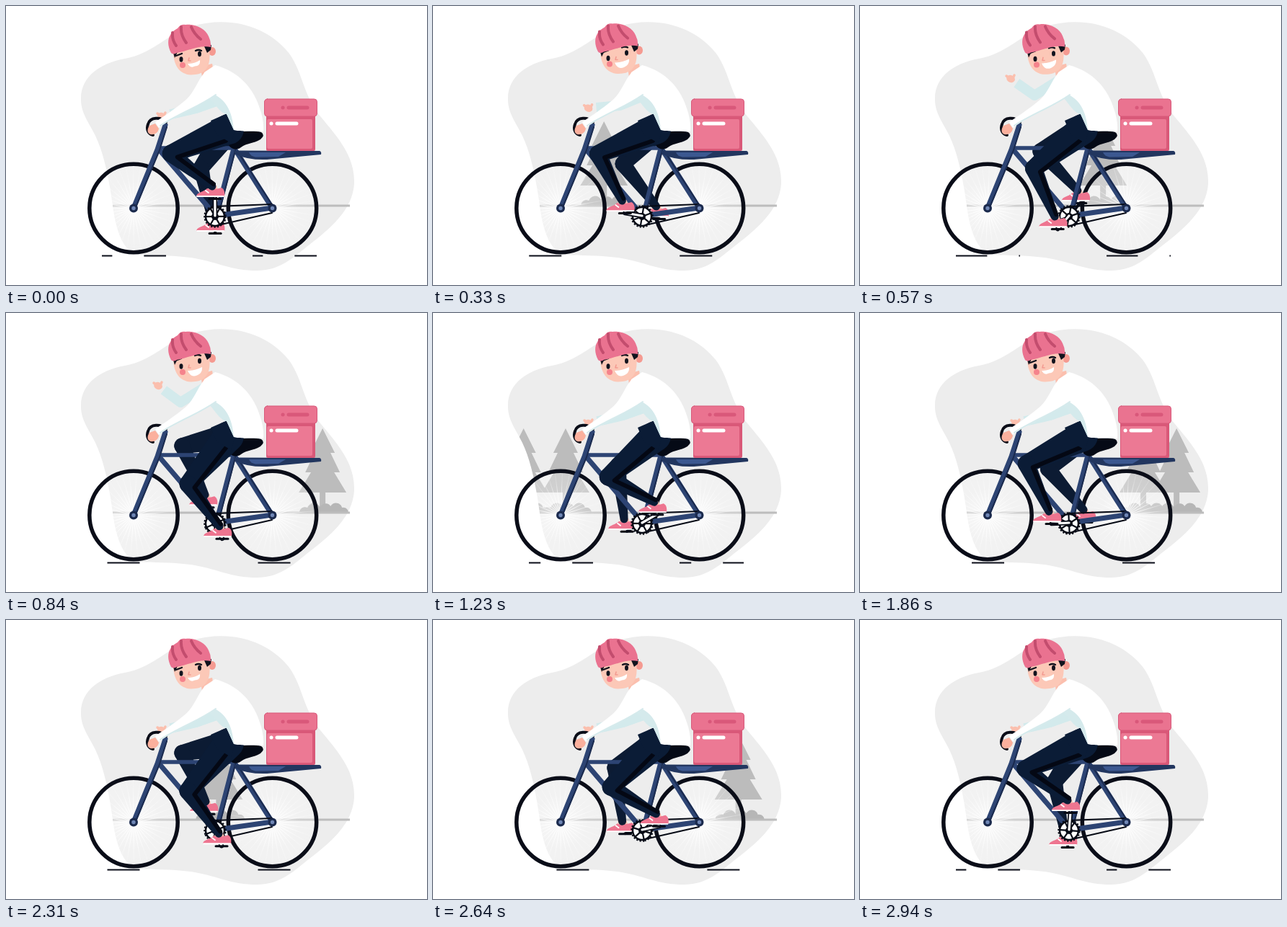
Recreate the animation shown at these times as an HTML page. Size 584 px wide and 387 px high, loop 2970 ms.

```html
<!DOCTYPE html>
<html lang="en">
<head>
<meta charset="utf-8">
<title>Cyclist</title>
<style>
html, body { margin: 0; width: 100%; height: 100%; overflow: hidden; background: #fff; }
svg { display: block; width: 584px; height: 387px; }
</style>
</head>
<body>
<svg viewBox="0 0 584 387" fill="none" stroke-linecap="round" stroke-linejoin="round">
  <defs>
    <path id="blob" d="M104 130C103 98 131 79 165 73C203 66 222 40 258 28C311 13 363 28 393 66C412 93 412 123 436 153C462 184 484 209 483 246C481 282 452 307 421 331C400 347 382 367 348 367C312 367 296 356 262 350C232 345 205 347 185 345C163 342 153 314 148 277C143 240 136 205 124 180C114 160 104 148 104 130Z"/>
    <clipPath id="inBlob"><use href="#blob"/></clipPath>
    <radialGradient id="glow">
      <stop offset="0" stop-color="#fff" stop-opacity=".7"/>
      <stop offset=".6" stop-color="#fff" stop-opacity=".3"/>
      <stop offset="1" stop-color="#fff" stop-opacity=".25"/>
    </radialGradient>
    <radialGradient id="fade" gradientUnits="userSpaceOnUse" cx="0" cy="0" r="60">
      <stop offset=".3" stop-color="#fff"/>
      <stop offset=".8" stop-color="#fff" stop-opacity=".25"/>
    </radialGradient>
    <g id="tree">
      <path fill="#bcbcbc" d="M0 160L17 194H11L24 221H16L33 249H4V276H-4V249H-33L-16 221H-24L-11 194H-17Z"/>
      <path fill="#b6b6b6" d="M-32 277C-32 270-25 268-21 270C-17 261-7 262-4 269C2 262 9 264 11 268C16 260 26 264 27 270C32 269 36 273 36 277Z"/>
    </g>
    <g id="shoe">
      <path fill="#fbc3b1" d="M-10-18H2L5-9H-10Z"/>
      <path fill="#ee7590" d="M-26-3C-25-9-17-8-11-14C-5-11 1-13 9-15C13-13 14-8 13-3Z"/>
      <path stroke="#fff" stroke-width="1.8" d="M-25-3H12M-13-11L-9-8"/>
      <path stroke="#070b16" stroke-width="3" d="M-8 0.500H8"/>
    </g>
  </defs>

  <use href="#blob" fill="#ededed"/>
  <g clip-path="url(#inBlob)">
    <g id="trees"></g>
  </g>
  <path stroke="#bdbdbd" stroke-width="3" stroke-linecap="butt" d="M148 277H477"/>
  <g id="dashes" stroke="#0a0d18" stroke-width="2" stroke-linecap="butt"></g>
  <g id="wheels"></g>

  <g id="farArm">
    <path id="farSleeve" stroke="#d3eaec" stroke-width="14" stroke-linecap="butt"/>
    <g id="farHand" fill="#fbbfae">
      <ellipse rx="6" ry="5" transform="rotate(25)"/>
      <path stroke="#fbbfae" stroke-width="3.5" d="M-2-1L-6-4M3-1L5-5"/>
    </g>
  </g>

  <path id="farCrank" stroke="#070b16" stroke-width="4"/>
  <use id="farShoe" href="#shoe"/>
  <g id="farLeg" fill="#0c1b33"></g>

  <g stroke="#2d4473" stroke-width="7">
    <path d="M213 200L290 290"/>
    <path d="M211 197H314" stroke-width="5.500"/>
    <path d="M318 190L292 290"/>
    <path d="M319 201L369 280L292 291"/>
    <path d="M221 165L210 199L177 280"/>
    <path stroke="#1a2a4e" stroke-width="2" d="M223 168L213 200L180 279M322 203L370 277M320 193L295 289"/>
  </g>
  <path fill="#22365f" d="M315 200.500L435 201Q438 202 437 206L362 213Q336 214 319 206Z"/>
  <path fill="#3c5890" d="M337 203H388L378 209L346 209.500Q339 208 337 203Z"/>
  <path stroke="#070b16" stroke-width="2" d="M290 278L369 275M290 305L369 287"/>
  <g id="hubs"></g>
  <circle cx="290" cy="292" r="13" fill="#fff" stroke="#070b16" stroke-width="2.500"/>
  <g id="ring" stroke="#070b16">
    <circle r="14.500" stroke-width="2.500" stroke-dasharray="2.200 2.200" stroke-linecap="butt"/>
    <path stroke-width="2.200" d="M-12 0H12M-6-10.400L6 10.400M-6 10.400L6-10.400"/>
  </g>
  <circle cx="290" cy="292" r="5" fill="#070b16"/>
  <path fill="#050a16" d="M306 172C326 176 341 172 354 175Q360 179 353 185C343 191 334 190 326 196C318 202 308 197 307 187Z"/>

  <path id="crankEdge" stroke="#070b16" stroke-width="6.500"/>
  <path id="crankCore" stroke="#fff" stroke-width="3.200"/>
  <use id="nearShoe" href="#shoe"/>
  <g id="nearLeg" fill="#0b1c36"></g>
  <path id="nearShade" stroke="#040814" stroke-width="6"/>
  <path fill="#0b1c36" d="M307 149L284 159L292 178L312 190L318 172Z"/>

  <path stroke="#0a0d18" stroke-width="4" d="M222 161C215 154 200 153 197 164C194 172 198 178 204 179"/>
  <path fill="#fbbfae" d="M270 84L286 80L289 97L272 99Z"/>
  <path fill="#fff" d="M275 92L290 82C322 91 344 112 354 148Q358 163 357 174C343 172 327 175 316 172L306 150L286 123L272 104Z"/>
  <path fill="#d5eaec" d="M287 122C304 129 314 145 316 172L306 150C298 149 292 139 283 128Z"/>
  <path fill="#fff" d="M277 91C265 102 263 120 246 133C234 143 222 151 207 161L212 169C238 150 268 140 292 122Z"/>
  <path stroke="#d5eaec" stroke-width="2" d="M214 166C238 150 267 140 291 123"/>
  <path fill="#fbb09d" d="M207 163L212 170C211 176 206 179 200 178C195 176 196 170 199 166Z"/>

  <g id="head">
    <ellipse cx="286" cy="63" rx="5" ry="6" fill="#f59a91"/>
    <path fill="#fcc8b7" d="M232 62C232 86 244 98 263 95C279 93 286 80 281 54Z"/>
    <path fill="#11131e" d="M275 56L285 54L284 61L279 65ZM232 65L238 64L234 72Z"/>
    <circle cx="245" cy="82" r="4" fill="#f5838c"/>
    <g id="brows" stroke="#11131e" stroke-width="2.300"><path d="M236 69L244 66M263 62Q267 60 271 62"/></g>
    <g fill="#11131e"><ellipse cx="243" cy="74" rx="2.500" ry="3.700"/><ellipse cx="268.500" cy="66.500" rx="2.500" ry="3.700"/></g>
    <path stroke="#f39a90" stroke-width="1.500" d="M254 72L253 76L256 76"/>
    <path id="smile" fill="#fff"/>
    <path fill="#ea7290" d="M229 65C221 50 226 37 238 31Q242 25 249 26C263 24 277 32 281 42Q285 50 284 57C268 54 254 62 237 65Q232 68 229 65Z"/>
    <path stroke="#c34d6e" stroke-width="4" d="M231 37Q230 47 236 55M243 29Q242 40 250 51M257 29Q261 39 270 46"/>
  </g>

  <rect x="361" y="150" width="68" height="51" rx="2" fill="#d95878"/>
  <rect x="362" y="157" width="63" height="41" rx="2" fill="#ec7994"/>
  <rect x="358.500" y="129" width="73" height="24" rx="4" fill="#ea7390" stroke="#d85a7b"/>
  <path stroke="#fff" stroke-width="5" d="M368 163H368.100M376 163H403"/>
  <path stroke="#d9587a" stroke-width="5" d="M384 141H384.100M392 141H418"/>
</svg>
<script>
const LOOP = 2970, CRANK_TURN = 1480, TAU = Math.PI * 2;
const BB = [290, 291], HIP = [309, 171];
const WHEELS = [177, 369.5];
const $ = id => document.getElementById(id);
const set = (id, name, value) => $(id).setAttribute(name, value);
const move = (id, [x, y]) => set(id, 'transform', `translate(${x} ${y})`);
const line = (...points) => 'M' + points.map(p => p.join(' ')).join('L');
const mix = (a, b, k) => a + (b - a) * k;
const mixPoint = (a, b, k) => a.map((v, i) => mix(v, b[i], k));
const ease = (t, from, to) => {
  const k = Math.min(1, Math.max(0, (t - from) / (to - from)));
  return k * k * (3 - 2 * k);
};

// Time each tree starts to cross the scene, slowing slightly on its way
const TREE_STARTS = [0, 1020, 1146, 1843];
$('trees').innerHTML = TREE_STARTS.map(() => '<use href="#tree"/>').join('');
function treeX(age) {
  const a = Math.min(1300, Math.max(0, age));
  return 85 + 0.485 * a - 0.000076 * a * a;
}

const SPOKES = 36;
$('wheels').innerHTML = WHEELS.map(x => {
  let d = '';
  for (let i = 0; i < SPOKES; i++) {
    const a = i * TAU / SPOKES;
    d += `M0 0L${60 * Math.cos(a)} ${60 * Math.sin(a)}`;
  }
  return `<g transform="translate(${x} 280.5)">
    <circle r="61" fill="url(#glow)"/>
    <path class="spokes" d="${d}" stroke="url(#fade)" stroke-width=".8"/>
    <circle r="61.2" stroke="#0a0d18" stroke-width="5.5"/></g>`;
}).join('');
$('hubs').innerHTML = WHEELS.map(x =>
  `<circle cx="${x}" cy="280.5" r="6" fill="#1b2a4d"/><circle cx="${x}" cy="280.5" r="2.7" fill="#6f86b5"/>`).join('');
const spokes = document.querySelectorAll('.spokes');

// Tapered limb with round ends
function limb([x1, y1], r1, [x2, y2], r2) {
  const a = Math.atan2(y2 - y1, x2 - x1);
  const lean = Math.acos((r1 - r2) / Math.hypot(x2 - x1, y2 - y1));
  const at = (x, y, r, b) => `${x + r * Math.cos(b)} ${y + r * Math.sin(b)}`;
  return `M${at(x1, y1, r1, a + lean)}A${r1} ${r1} 0 1 1 ${at(x1, y1, r1, a - lean)}` +
    `L${at(x2, y2, r2, a - lean)}A${r2} ${r2} 0 0 1 ${at(x2, y2, r2, a + lean)}Z`;
}

function leg(id, [px, py], thigh, shin, hipR, kneeR) {
  const ankle = [px - 4, py - 17];
  const dx = ankle[0] - HIP[0], dy = ankle[1] - HIP[1], d = Math.hypot(dx, dy);
  const bend = Math.acos((thigh * thigh + d * d - shin * shin) / (2 * thigh * d));
  const a = Math.atan2(dy, dx) + bend;
  const knee = [HIP[0] + thigh * Math.cos(a), HIP[1] + thigh * Math.sin(a)];
  $(id).innerHTML = `<path d="${limb(HIP, hipR, knee, kneeR)}"/><path d="${limb(knee, kneeR, ankle, 5.5)}"/>`;
  return { knee, ankle };
}

function pedal(angle) {
  return [BB[0] - 24 * Math.sin(angle), BB[1] - 24 * Math.cos(angle)];
}

function drawDashes(t) {
  const gap = 89, length = 45, shift = (102 - 133 + t * gap / 245) % gap;
  let d = '';
  for (const left of [133, 342]) {
    for (let s = shift - gap; s < gap; s += gap) {
      const from = Math.max(0, s), to = Math.min(gap, s + length);
      if (to > from) d += `M${left + from} 346.5H${left + to}`;
    }
  }
  $('dashes').innerHTML = `<path d="${d}"/>`;
}

function drawWave(t) {
  const up = ease(t, 250, 520) * (1 - ease(t, 880, 1130));
  const sway = up * 3 * Math.sin((t - 840) / 110);
  const rest = mixPoint([216, 153], [211, 101], up);
  const hand = [rest[0] + sway, rest[1]];
  const elbow = mixPoint([264, 142], [242, 124], up);
  const shoulder = mixPoint([298, 130], [276, 103], up);
  const cuff = mixPoint(hand, elbow, 0.25);
  set('farSleeve', 'd', line(cuff, elbow, shoulder));
  move('farHand', hand);
}

function drawFace(t) {
  const joy = ease(t, 80, 330) * (1 - ease(t, 1300, 1600));
  const lift = t < 660 ? -1.5 * Math.sin(Math.PI * t / 660) : 0;
  move('head', [0, lift]);
  move('brows', [-joy, -3 * joy]);
  const right = mix(269, 272, joy), low = mix(87, 90, joy);
  set('smile', 'd', `M252 80Q262 80 ${right} 75Q${right + 1} 83 ${right - 7} ${low - 3.5}Q256 ${low} 252 80Z`);
}

function draw(t) {
  [...$('trees').children].forEach((tree, i) =>
    tree.setAttribute('transform', `translate(${treeX(t - TREE_STARTS[i])} 0)`));
  spokes.forEach(s => s.setAttribute('transform', `rotate(${-t * 1080 / LOOP})`));
  drawDashes(t);

  const angle = t / CRANK_TURN * TAU;
  const near = pedal(angle), far = pedal(angle + Math.PI);
  set('ring', 'transform', `translate(290 292) rotate(${-angle * 360 / TAU})`);
  set('farCrank', 'd', line(BB, far));
  set('crankEdge', 'd', line(BB, near));
  set('crankCore', 'd', line(BB, near));
  move('farShoe', far);
  move('nearShoe', near);
  leg('farLeg', far, 66, 75, 18, 11);
  const { knee, ankle } = leg('nearLeg', near, 87, 73, 21, 12);
  set('nearShade', 'd', line([HIP[0] - 4, HIP[1] + 16], [knee[0] + 9, knee[1] + 5], [ankle[0] + 2, ankle[1] - 3]));

  drawWave(t);
  drawFace(t);
}

const start = performance.now();
function tick() {
  draw((performance.now() - start) % LOOP);
  requestAnimationFrame(tick);
}
draw(0);
requestAnimationFrame(tick);
</script>
</body>
</html>
```
